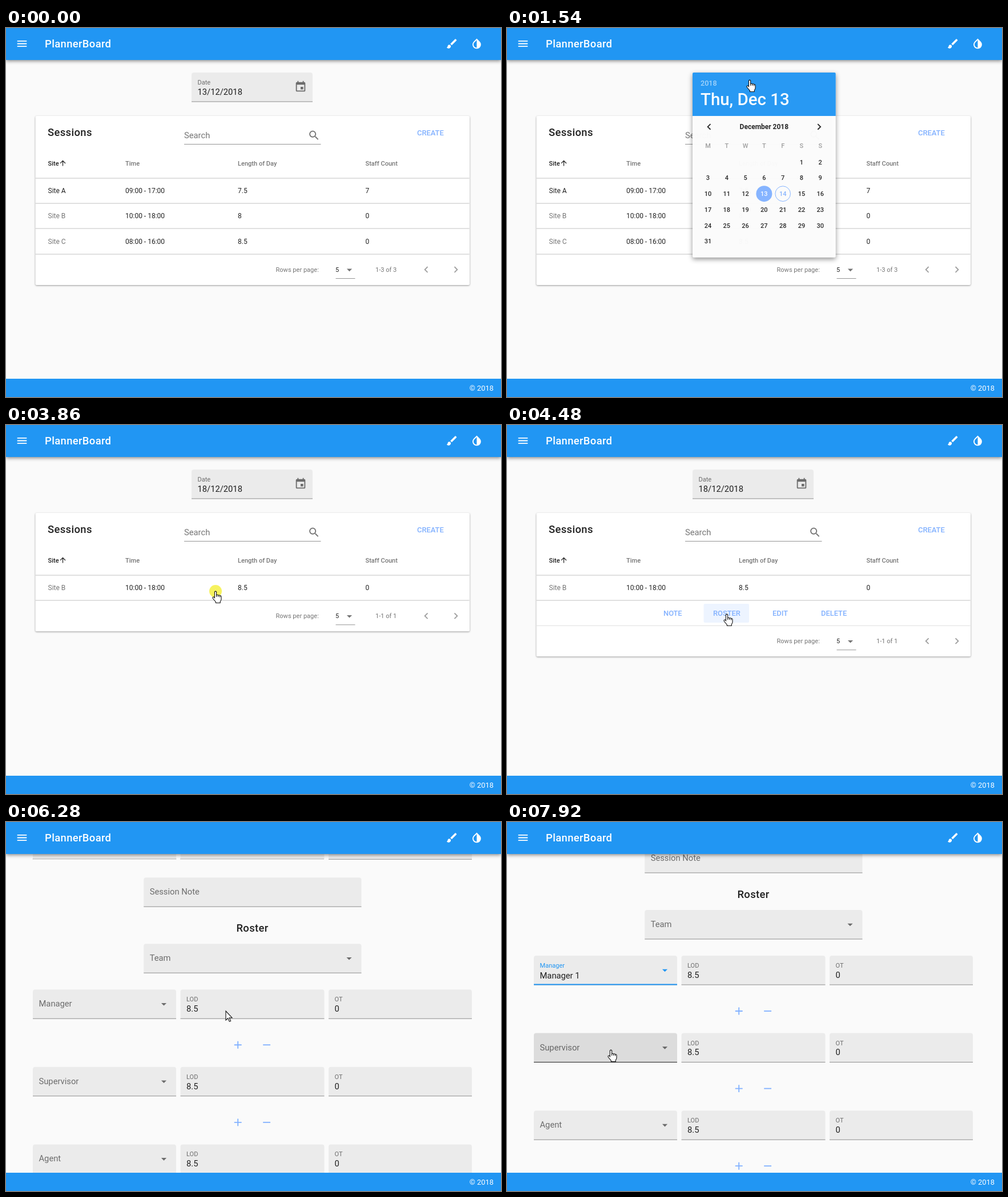
An HTML page with a canvas for the animation above (8 s loop, 867 by 646 pixels).

```html
<!DOCTYPE html>
<html lang="en">
<head>
<meta charset="utf-8">
<title>Session planner</title>
<style>
html, body { margin: 0; width: 100%; height: 100%; overflow: hidden; background: #fafafa; }
canvas { display: block; }
</style>
</head>
<body>
<canvas width="867" height="646"></canvas>
<script>
const ctx = document.querySelector('canvas').getContext('2d');
const LOOP = 8000, SCALE = 0.921;
const BLUE = '#2196f3', ACCENT = '#82b1ff';
const ink = a => `rgba(0,0,0,${a})`;
const DARK = ink(0.87), MID = ink(0.54), PALE = ink(0.38), LINE = ink(0.42);

const ICONS = {
  menu: 'M3 18h18v-2H3v2zm0-5h18v-2H3v2zm0-7v2h18V6H3z',
  brush: 'M7 14c-1.66 0-3 1.34-3 3 0 1.31-1.16 2-2 2 .92 1.22 2.49 2 4 2 2.21 0 4-1.79 4-4 0-1.66-1.34-3-3-3zm13.71-9.37l-1.34-1.34c-.39-.39-1.02-.39-1.41 0L9 12.25 11.75 15l8.96-8.96c.39-.39.39-1.02 0-1.41z',
  invert: 'M17.66 7.93L12 2.27 6.34 7.93c-3.12 3.12-3.12 8.19 0 11.31C7.9 20.8 9.95 21.58 12 21.58c2.05 0 4.1-.78 5.66-2.34 3.12-3.12 3.12-8.19 0-11.31zM12 19.59c-1.6 0-3.11-.62-4.24-1.76C6.62 16.69 6 15.19 6 13.59s.62-3.11 1.76-4.24L12 5.1v14.49z',
  event: 'M17 12h-5v5h5v-5zM16 1v2H8V1H6v2H5c-1.11 0-1.99.9-1.99 2L3 19c0 1.1.89 2 2 2h14c1.1 0 2-.9 2-2V5c0-1.1-.9-2-2-2h-1V1h-2zm3 18H5V8h14v11z',
  search: 'M15.5 14h-.79l-.28-.27C15.41 12.59 16 11.11 16 9.5 16 5.91 13.09 3 9.5 3S3 5.91 3 9.5 5.91 16 9.5 16c1.61 0 3.09-.59 4.23-1.57l.27.28v.79l5 4.99L20.49 19l-4.99-5zm-6 0C7.01 14 5 11.99 5 9.5S7.01 5 9.5 5 14 7.01 14 9.5 11.99 14 9.5 14z',
  up: 'M4 12l1.41 1.41L11 7.83V20h2V7.83l5.58 5.59L20 12l-8-8-8 8z',
  drop: 'M7 10l5 5 5-5z',
  left: 'M15.41 7.41L14 6l-6 6 6 6 1.41-1.41L10.83 12z',
  right: 'M10 6L8.59 7.41 13.17 12l-4.58 4.59L10 18l6-6z',
  plus: 'M19 13h-6v6h-2v-6H5v-2h6V5h2v6h6v2z',
  minus: 'M19 13H5v-2h14v2z'
};
for (const k in ICONS) ICONS[k] = new Path2D(ICONS[k]);

const HAND = new Path2D('M-1.6 1.2Q0-.9 1.6 1.2V6.8Q3.6 5.4 4.6 7.2 6.6 6 7.5 8 9.8 7.2 10 9.8V14Q9.8 16.5 8.2 18V20.5H.4V18.6L-4.6 12.8Q-5.8 9.6-3 10L-1.6 11.5Z');
const KNUCKLES = new Path2D('M1.6 6.8V10M4.6 7.2V10M7.5 8V10.4');
const ARROW = new Path2D('M0 0V16L3.7 12.5 6.3 18.4 8.6 17.4 6.1 11.7H11Z');
const BEAM = new Path2D('M-3-8H-1L0-7 1-8H3M0-7V7M-3 8H-1L0 7 1 8H3');

// [time, x, y] of the pointer tip
const TRACK = [
  [300, 714, 553], [680, 425, 78], [790, 425, 78], [840, 425, 75], [1070, 425, 75],
  [1250, 425, 91], [1580, 425, 91], [1850, 383, 330], [2770, 383, 330], [3010, 396, 172],
  [3110, 396, 172], [3390, 367, 291], [4330, 367, 291], [4480, 385, 331], [6380, 385, 331],
  [6750, 250, 278], [7690, 250, 278], [7900, 182, 399]
];
const CLICKS = [[840, 920], [1930, 2010], [3860, 3940], [4650, 4730], [6830, 6980], [7610, 7690]];

const ramp = (t, a, b) => Math.min(1, Math.max(0, (t - a) / (b - a)));
const easeOut = (p, n = 3) => 1 - (1 - p) ** n;
const smooth = p => p * p * (3 - 2 * p);
const between = (t, a, b) => t >= a && t < b;

function rect(x, y, w, h, color, r = 0) {
  ctx.fillStyle = color;
  ctx.beginPath();
  ctx.roundRect(x, y, w, h, r);
  ctx.fill();
}

function shadowed(x, y, w, h, blur, dy, alpha) {
  ctx.save();
  ctx.shadowColor = ink(alpha);
  ctx.shadowBlur = blur;
  ctx.shadowOffsetY = dy;
  rect(x, y, w, h, '#fff', 2);
  ctx.restore();
}

function text(str, x, y, size, color = DARK, { weight = 400, align = 'left', gap = 0 } = {}) {
  ctx.font = `${weight} ${size}px Roboto, sans-serif`;
  ctx.letterSpacing = gap + 'px';
  ctx.textAlign = align;
  ctx.fillStyle = color;
  ctx.fillText(str, x, y);
}

const heading = (str, x, y, align, color) =>
  text(str, x, y, 18.4, color, { weight: 500, align, gap: 0.37 });
const button = (str, x, y) => text(str, x, y, 12.9, ACCENT, { weight: 500 });

function icon(name, cx, cy, color, scale = SCALE) {
  ctx.save();
  ctx.translate(cx, cy);
  ctx.scale(scale, scale);
  ctx.translate(-12, -12);
  ctx.fillStyle = color;
  ctx.fill(ICONS[name]);
  ctx.restore();
}

function layer(alpha, draw, x = 0, y = 0, scale = 1) {
  if (alpha <= 0 || scale <= 0) return;
  ctx.save();
  ctx.globalAlpha *= alpha;
  ctx.translate(x, y);
  ctx.scale(scale, scale);
  draw();
  ctx.restore();
}

function field(x, y, w, label, value, o = {}) {
  const { hover, disabled, select, focus = 0, focusColor = BLUE, drop = 0 } = o;
  const h = 51, active = focus > 0 && focusColor === BLUE;
  rect(x, y, w, h, ink(hover ? 0.12 : 0.06), [4, 4, 0, 0]);
  const soft = disabled ? PALE : MID;
  if (value || active) text(label, x + 10.5, y + 21, 11.05, active ? BLUE : soft);
  else text(label, x + 10.5, y + 30, 14.74, soft);
  if (value) text(value, x + 10.5, y + 38.7 + drop, 14.74, disabled ? PALE : DARK);
  if (select) icon('drop', x + w - 21.5, y + 25.5, active ? BLUE : MID);
  if (disabled) {
    for (let i = 0; i < w; i += 2) rect(x + i, y + h - 1, 1, 1, ink(0.5));
  } else rect(x, y + h - 0.5, w, 1, hover ? DARK : LINE);
  if (focus > 0) rect(x + w * (1 - focus) / 2, y + h - 1.5, w * focus, 2, focusColor);
}

function sessionsPage(t) {
  const changed = t >= 2300;
  field(325, 78, 212, 'Date', t < 2010 ? '13/12/2018' : '18/12/2018', {
    hover: between(t, 640, 1200),
    focus: between(t, 1070, 2560) ? Math.max(0.02, 1 - ramp(t, 2300, 2530)) : 0,
    focusColor: '#222'
  });
  icon('event', 516, 103, MID);

  const rows = changed
    ? [['Site B', '10:00 - 18:00', '8.5', '0']]
    : [['Site A', '09:00 - 17:00', '7.5', '7'], ['Site B', '10:00 - 18:00', '8', '0'], ['Site C', '08:00 - 16:00', '8.5', '0']];
  const columns = [73.5, 209, 406, 629.5];
  const grow = 44 * easeOut(ramp(t, 3940, 4180), 2);
  const rowsEnd = 263 + 44.3 * rows.length, end = rowsEnd + grow;

  shadowed(51.5, 154, 760.5, end + 54 - 154, 3, 1, 0.4);
  heading('Sessions', 73, 189);
  text('Search', 312, 193, 14.74, MID);
  icon('search', 539.5, 188, MID);
  rect(312, 203, 239.5, 1, between(t, 2970, 3200) ? DARK : LINE);
  button('CREATE', 720, 187.5);

  ['Site', 'Time', 'Length of Day', 'Staff Count'].forEach((s, i) =>
    text(s, columns[i], 241, 11.05, i ? MID : DARK, { weight: 500 }));
  icon('up', 99.5, 236.5, DARK, 0.62);
  rect(51.5, 262.5, 760, 1, '#c2c2c2');
  rows.forEach((row, r) => {
    const y = 263 + 44.3 * r;
    row.forEach((s, i) => text(s, columns[i], y + 26, 12, !i && row[3] === '0' ? MID : DARK));
    rect(51.5, Math.round(y + 44) - 0.5, 760, 1, '#c2c2c2');
  });

  if (grow) {
    ctx.save();
    ctx.beginPath();
    ctx.rect(51, rowsEnd, 762, grow);
    ctx.clip();
    if (between(t, 4400, 5040)) rect(344.5, 313, 79.5, 33, 'rgba(130,177,255,.14)', 2);
    if (t > 4650) layer(1 - ramp(t, 4800, 5000), () => {
      ctx.beginPath();
      ctx.roundRect(344.5, 313, 79.5, 33, 2);
      ctx.clip();
      const r = 45 * ramp(t, 4650, 4850);
      rect(385 - r, 331 - r, 2 * r, 2 * r, 'rgba(130,177,255,.2)', r);
    });
    [['NOTE', 274], ['ROSTER', 361], ['EDIT', 465], ['DELETE', 550]].forEach(([s, x]) => button(s, x, 334));
    ctx.restore();
    rect(51.5, end - 0.5, 760, 1, '#dedede');
  }

  const mid = end + 27;
  text('Rows per page:', 472.5, mid + 4, 11.05, MID);
  text('5', 577, mid + 4, 11.05);
  icon('drop', 601.5, mid + 0.5, MID);
  rect(577.5, mid + 15, 34, 1, LINE);
  text(changed ? '1-1 of 1' : '1-3 of 3', 647, mid + 4, 11.05, MID);
  icon('left', 736, mid, PALE);
  icon('right', 788, mid, PALE);
}

function datePicker(picked) {
  shadowed(0, 0, 251, 324, 9, 3, 0.45);
  rect(0, 0, 251, 76, BLUE, [2, 2, 0, 0]);
  text('2018', 14, 23.5, 12.6, 'rgba(255,255,255,.6)', { weight: 500 });
  text(`${picked === 13 ? 'Thu' : 'Tue'}, Dec ${picked}`, 14, 57, 29.5, '#fff', { weight: 500 });
  icon('left', 29, 95, DARK);
  icon('right', 222, 95, DARK);
  text('December 2018', 125.5, 99.5, 12, DARK, { weight: 700, align: 'center' });

  const col = i => 27 + 32.83 * i;
  [...'MTWTFSS'].forEach((s, i) => text(s, col(i), 132, 11, PALE, { weight: 500, align: 'center' }));
  for (let d = 1; d <= 31; d++) {
    const x = col((d + 4) % 7), y = 157 + 27.7 * Math.floor((d + 4) / 7);
    if (d === picked) rect(x - 14, y - 14, 28, 28, ACCENT, 14);
    else if (d === 14) {
      ctx.strokeStyle = ACCENT;
      ctx.lineWidth = 1;
      ctx.beginPath();
      ctx.arc(x, y, 13.3, 0, 7);
      ctx.stroke();
    }
    text(d, x, y + 4, 11, d === picked ? '#fff' : d === 14 ? ACCENT : DARK, { weight: 500, align: 'center' });
  }
}

function rosterPage(t) {
  heading('Tuesday - 2018-12-18', 431, 115, 'center');
  field(47, 136, 251, 'Time', '10:00 - 18:00', { disabled: true });
  field(305.5, 136, 252, 'Site', 'Site B', { disabled: true });
  field(565, 136, 251, 'Length of day', '8.5');
  field(241.2, 219, 381.3, 'Session Note');
  heading('Roster', 431.5, 314, 'center');
  field(241.2, 335, 381.3, 'Team', '', { select: true });

  const chosen = t >= 7690;
  ['Manager', 'Supervisor', 'Agent'].forEach((role, i) => {
    const y = 415 + 135.6 * i;
    const state = [
      { hover: between(t, 6700, 6990), focus: easeOut(ramp(t, 6980, 7280)), drop: 1.5 },
      { hover: t > 7850 }, {}
    ][i];
    layer(ramp(t, 5500, 5730), () => {
      field(47, y, 251, role, !i && chosen ? 'Manager 1' : '', { select: true, ...state });
      field(305.5, y, 252, 'LOD', '8.5');
      field(565, y, 251, 'OT', '0');
    });
    icon('plus', 406.2, y + 97, ACCENT);
    icon('minus', 456.6, y + 97, ACCENT);
  });
}

function selectMenu() {
  shadowed(0, 0, 251, 60, 7, 2, 0.4);
  rect(0, 8, 251, 44, ink(0.05));
  text('Manager 1', 15, 35, 14.74);
}

function frameBars() {
  ctx.save();
  ctx.shadowColor = ink(0.45);
  ctx.shadowBlur = 6;
  ctx.shadowOffsetY = 2;
  rect(0, 0, 867, 56, BLUE);
  ctx.restore();
  icon('menu', 28, 27.5, '#fff');
  heading('PlannerBoard', 68, 34, 'left', '#fff');
  icon('brush', 781, 27.5, '#fff');
  icon('invert', 824.5, 27.5, '#fff');
  rect(0, 614, 867, 32, BLUE);
  text('© 2018', 854, 635, 12.9, '#fff', { align: 'right' });
}

function pointer(t) {
  if (t < 300) return;
  const i = TRACK.findIndex(k => k[0] > t);
  const b = TRACK.at(i), a = i < 0 ? b : TRACK[i - 1];
  const p = a === b ? 1 : smooth(ramp(t, a[0], b[0]));
  const x = a[1] + (b[1] - a[1]) * p, y = a[2] + (b[2] - a[2]) * p;

  if (CLICKS.some(c => between(t, ...c))) rect(x - 11, y - 11, 22, 22, 'rgba(243,238,50,.78)', 11);
  ctx.save();
  ctx.translate(x, y);
  ctx.fillStyle = '#fff';
  ctx.strokeStyle = '#111';
  ctx.lineWidth = 1.1;
  if (between(t, 2950, 3200)) ctx.stroke(BEAM);
  else {
    const arrow = t < 620 || between(t, 4900, 6680);
    const shape = arrow ? ARROW : HAND;
    ctx.fill(shape);
    ctx.stroke(shape);
    if (!arrow) ctx.stroke(KNUCKLES);
  }
  ctx.restore();
}

function draw(t) {
  rect(0, 0, 867, 646, '#fafafa');
  if (t < 5040) {
    layer(1 - ramp(t, 4760, 5040), () => sessionsPage(t));
    const open = easeOut(ramp(t, 1200, 1580)), close = 1 - ramp(t, 2300, 2610);
    layer(easeOut(ramp(t, 1200, 1620), 2) * close, () => datePicker(t < 1930 ? 13 : 18), 325, 78, open * close);
  } else {
    const scroll = 181 * smooth(ramp(t, 5960, 6480));
    layer(ramp(t, 5400, 5520), () => rosterPage(t), 0, -scroll);
    const shown = easeOut(ramp(t, 6990, 7330));
    layer(shown * (1 - ramp(t, 7680, 7850)), selectMenu, 47, 243, shown);
  }
  frameBars();
  pointer(t);
}

function tick() {
  draw(performance.now() % LOOP);
  requestAnimationFrame(tick);
}
tick();
</script>
</body>
</html>
```
